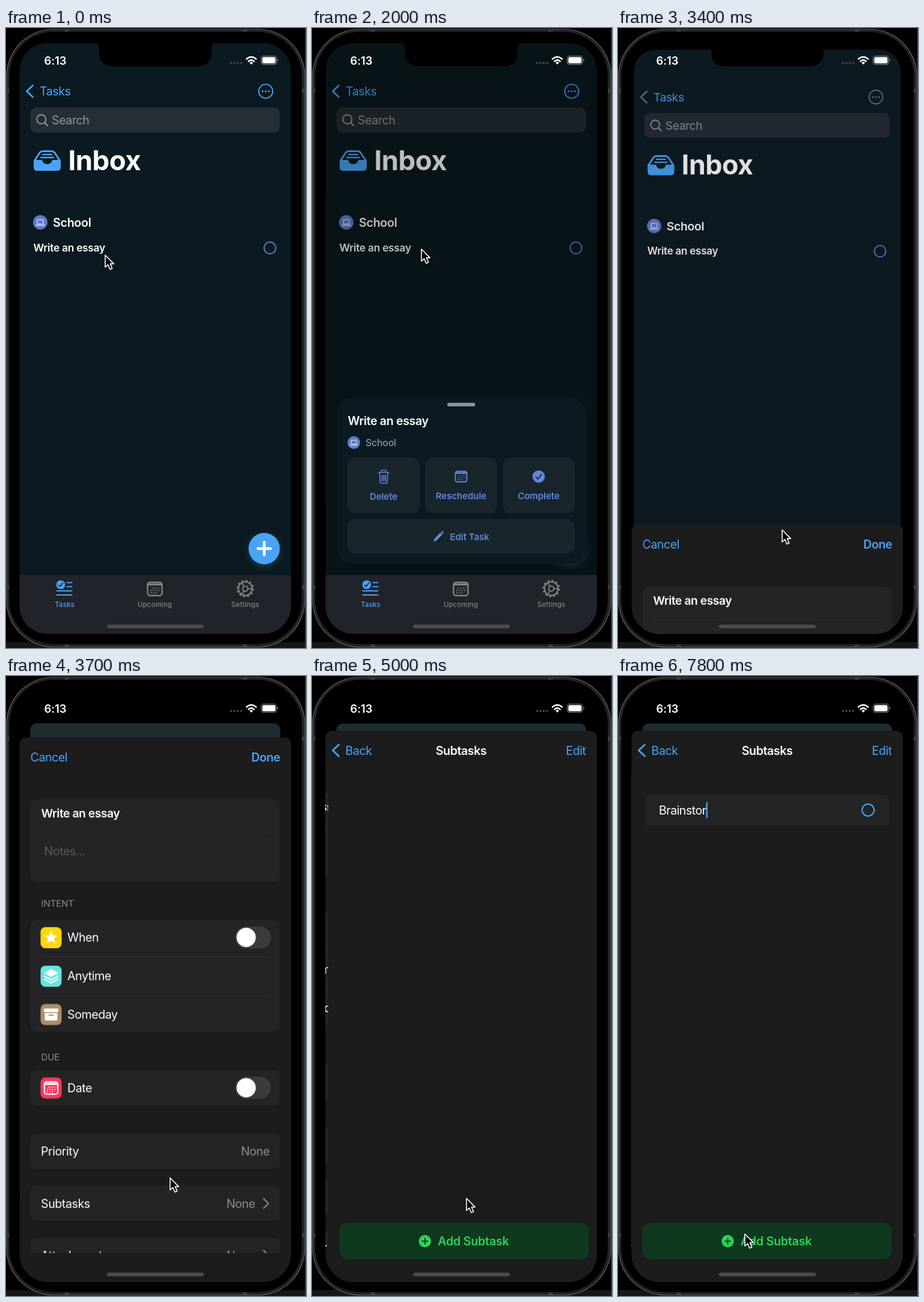
Recreate the animation shown at these times as an HTML page. Size 499x1029 px, loop 8 s.

```html
<!DOCTYPE html>
<html lang="en">
<head>
<meta charset="utf-8">
<title>Task app walkthrough</title>
<style>
  html, body { margin: 0; width: 100%; height: 100%; overflow: hidden; background: #000; }
  svg { display: block; width: 499px; height: 1029px; }
  :root { --blue: #4aa3f5; --violet: #6485dc; }
  text { font: 400 19.66px Inter, "Open Sans", sans-serif; letter-spacing: -.47px; fill: #fff; white-space: pre; }
  .semi { font-weight: 600; }
  .mid { text-anchor: middle; }
  .end { text-anchor: end; }
  .blue { fill: var(--blue); }
  .grey { fill: #8e8e93; }
  .faint { fill: #5b5b5f; }
  .small { font-size: 15px; letter-spacing: -.1px; }
  .tab { font-size: 11.56px; font-weight: 500; letter-spacing: .05px; }
  .off { fill: #808286; }
  .act text { font-size: 15px; font-weight: 600; letter-spacing: -.05px; fill: var(--violet); }
  .line { fill: none; stroke: currentColor; stroke-linecap: round; stroke-linejoin: round; }
  .cell { fill: #242426; }
  .rule { stroke: #303032; }

  .anim { animation: 8s linear infinite; }
  #cursor { animation-name: cursor; }
  #layer { animation-name: recede; transform-origin: 248.5px 25px; }
  #back { animation-name: back; }
  #tint { animation-name: tint; }
  #dim { animation-name: dim; }
  #card { animation-name: card; }
  #sheet { animation-name: rise; }
  #form { animation-name: formOut; }
  #formNav { animation-name: navOut; }
  #subs { animation-name: subsIn; }
  #subsNav { animation-name: navIn; }
  #row { animation-name: row; }

  @keyframes cursor {
    0% { transform: translate(165px, 377px); animation-timing-function: ease-in-out; }
    10%, 25% { transform: translate(182px, 367px); animation-timing-function: ease-in-out; }
    33.75%, 48.75% { transform: translate(273px, 833px); animation-timing-function: ease-in-out; }
    53.75%, 70% { transform: translate(257px, 867px); animation-timing-function: ease-in-out; }
    76.25%, 100% { transform: translate(211px, 926px); }
  }
  @keyframes card {
    0%, 13.75% { transform: translateY(410px); animation-timing-function: cubic-bezier(.4, 0, .05, 1); }
    20%, 36.25% { transform: translateY(0); animation-timing-function: ease-in; }
    41.25%, 100% { transform: translateY(410px); }
  }
  @keyframes dim {
    0%, 13.75% { opacity: 0; }
    18.75%, 36.25% { opacity: .26; }
    42.5% { opacity: .12; }
    47.25%, 100% { opacity: 0; }
  }
  @keyframes recede {
    0%, 41.25% { transform: translateY(0) scale(1); animation-timing-function: cubic-bezier(.4, 0, .05, 1); }
    47.25%, 100% { transform: translateY(54px) scale(.92); }
  }
  @keyframes back {
    0%, 41.25% { fill: #0b1920; rx: 44px; animation-timing-function: cubic-bezier(.4, 0, .05, 1); }
    47.25%, 100% { fill: #202b32; rx: 11px; }
  }
  @keyframes tint {
    0%, 41.25% { color: #4aa3f5; }
    42.5%, 100% { color: #6a7177; }
  }
  @keyframes rise {
    0%, 41.25% { transform: translateY(1010px); animation-timing-function: cubic-bezier(.4, 0, .05, 1); }
    47.25%, 100% { transform: translateY(91px); }
  }
  @keyframes formOut {
    0%, 57.5% { transform: translateX(0); animation-timing-function: cubic-bezier(.4, 0, .05, 1); }
    63.5%, 100% { transform: translateX(-135px); }
  }
  @keyframes subsIn {
    0%, 57.5% { transform: translateX(452px); animation-timing-function: cubic-bezier(.4, 0, .05, 1); }
    63.5%, 100% { transform: translateX(0); }
  }
  @keyframes navOut {
    0%, 57.5% { opacity: 1; }
    60%, 100% { opacity: 0; }
  }
  @keyframes navIn {
    0%, 57.5% { opacity: 0; transform: translateX(60px); animation-timing-function: cubic-bezier(.4, 0, .05, 1); }
    62.5%, 100% { opacity: 1; transform: translateX(0); }
  }
  @keyframes row {
    0%, 77.5% { opacity: 0; }
    80%, 100% { opacity: 1; }
  }
</style>
</head>
<body>
<svg viewBox="0 0 499 1029">
  <defs>
    <clipPath id="screen"><rect x="22.5" y="25" width="451.5" height="980.5" rx="46"/></clipPath>
    <clipPath id="list"><rect x="0" y="60" width="700" height="796"/></clipPath>
    <g id="cal" class="line">
      <rect x="-12" y="-11" width="24" height="22" rx="4" stroke-width="2.4"/>
      <path d="M-11-7.5H11" stroke-width="3.6"/>
      <path d="M-5-1.5H9M-7.5 2.5H9M-7.5 6.5H4" stroke-width="2" stroke-dasharray="2 2.4" stroke-linecap="butt"/>
    </g>
    <g id="school">
      <circle r="12" fill="#607cc8"/>
      <g class="line" color="#d5def5" stroke-width="1.3"><rect x="-5" y="-4.5" width="10" height="7.5" rx="1"/><path d="M-7.5 5H7.5"/></g>
    </g>
    <path id="chevron" class="line" d="M44.5 95.5 34.5 105 44.5 114.5" stroke-width="2.8"/>
    <g id="switch">
      <rect x="381" y="-18" width="60" height="36.5" rx="18.2" fill="#3b3b3e"/>
      <circle cx="399.5" r="16" fill="#fff"/>
    </g>
    <path id="more" class="line" d="M428.5-8 436.5 0 428.5 8" stroke-width="2" color="#8e8e93"/>
  </defs>

  <!-- phone body -->
  <rect width="499" height="1029"/>
  <rect y="1019" width="499" height="10" fill="#161616"/>
  <rect x="1" y="2" width="496" height="1025.5" rx="78" fill="#222" stroke="#626262" stroke-width="1.2"/>
  <rect x="5.5" y="6.5" width="486.5" height="1016" rx="73"/>
  <path d="M1 104H5M1 928H5M492 104H497M492 928H497M101 2V6M397 2V6M101 1023V1027M397 1023V1027" stroke="#3c3c3c" stroke-width="7"/>
  <path d="M498.3 0V1029" stroke="#0b6d17" stroke-width="1.4"/>

  <g clip-path="url(#screen)">
    <!-- inbox -->
    <g id="layer" class="anim">
      <rect id="back" class="anim" x="22.5" y="25" width="451.5" height="1080" rx="44"/>
      <g id="tint" class="anim">
        <use href="#chevron"/>
        <circle class="line" cx="432" cy="105" r="11.6" stroke-width="1.9"/>
        <path class="line" d="M426.8 105h.01M432 105h.01M437.2 105h.01" stroke-width="3.2"/>
      </g>
      <text class="blue" x="56" y="112">Tasks</text>
      <rect x="40.5" y="132" width="415" height="41.5" rx="10" fill="#252e35"/>
      <path class="line" d="M65 157.5 69 162M66.3 151.5a7.5 7.5 0 1 1-15 0a7.5 7.5 0 1 1 15 0" stroke-width="1.9" color="#949ba0"/>
      <text x="76" y="160" style="fill:#8f969c">Search</text>
      <g color="#4aa3f5">
        <path class="line" d="M47.5 220 56 207Q58 204.5 61 204.5H76Q79 204.5 81 207L89.5 220" stroke-width="3"/>
        <path class="line" d="M61 210H76M58 215H79" stroke-width="2.3"/>
        <path fill="currentColor" d="M46 219H60Q61.5 226 68.5 226T77 219H91V231Q91 237 85 237H52Q46 237 46 231Z"/>
      </g>
      <text x="103.5" y="236" style="font-size:45.5px;font-weight:700;letter-spacing:-.5px">Inbox</text>
      <use href="#school" x="57" y="322.5"/>
      <text class="semi" x="78" y="330" style="letter-spacing:-.3px">School</text>
      <text class="semi" x="45.5" y="371" style="font-size:17.3px;letter-spacing:-.25px">Write an essay</text>
      <circle class="line" cx="439" cy="365" r="9.7" stroke-width="2" color="#5b7cd0"/>
      <g style="filter:drop-shadow(0 3px 6px #4aa3f544)"><circle cx="429.5" cy="864" r="26" fill="#4aa3f5"/></g>
      <path class="line" d="M429.5 853.5V874.5M419 864H440" stroke-width="4.6" color="#fff"/>
      <rect id="dim" class="anim" x="22" y="25" width="453" height="883"/>
      <rect x="22" y="908" width="453" height="200" fill="#20232a"/>
      <g color="#4aa3f5">
        <circle cx="91" cy="924" r="7.3" fill="currentColor"/>
        <path class="line" d="M87.5 924.5 90 927 94.5 921" stroke-width="1.7" color="#20232a"/>
        <path class="line" d="M101.5 920.5H109.5M101.5 927.3H109.5M84.5 934.3H109.5M84.5 941H109.5" stroke-width="2.1"/>
      </g>
      <g color="#808286">
        <use href="#cal" x="247.5" y="931"/>
        <g class="line" transform="translate(398 930.5)">
          <circle r="11.3" stroke-width="2"/>
          <circle r="13.2" stroke-width="2.6" stroke-dasharray="3.4 3.511" stroke-linecap="butt"/>
          <circle r="4.3" stroke-width="2"/>
          <path d="M4.3 0H11M-2.2-3.7-5.5-9.5M-2.2 3.7-5.5 9.5" stroke-width="1.8"/>
        </g>
      </g>
      <text class="tab mid blue" x="97.5" y="961">Tasks</text>
      <text class="tab mid off" x="247.5" y="961">Upcoming</text>
      <text class="tab mid off" x="398" y="961" style="letter-spacing:.2px">Settings</text>
    </g>

    <!-- task card -->
    <g id="card" class="anim">
      <rect x="41" y="614" width="415" height="276" rx="26" fill="#0b1a21"/>
      <rect x="225" y="622" width="46.5" height="6" rx="3" fill="#8f9396"/>
      <text class="semi" x="59.5" y="658.5" style="letter-spacing:-.4px">Write an essay</text>
      <use href="#school" transform="translate(69.5 688) scale(.87)"/>
      <text x="89" y="693.5" style="font-size:16px;font-weight:500;letter-spacing:-.3px;fill:#8d9498">School</text>
      <g class="act" color="#6485dc">
        <g fill="#18262c">
          <rect x="59" y="713" width="120" height="92.5" rx="13"/>
          <rect x="188.5" y="713" width="119.5" height="92.5" rx="13"/>
          <rect x="317.5" y="713" width="119.5" height="92.5" rx="13"/>
          <rect x="59" y="815" width="378" height="57" rx="13"/>
        </g>
        <path class="line" d="M110.5 737.5H128M115.5 737V735Q115.5 734 116.5 734H122Q123 734 123 735V737M112.5 738 113.5 753.5Q113.6 755.5 115.5 755.5H123Q125 755.5 125 753.5L126 738M116.3 742 116.7 751.5M119.3 742V751.5M122.3 742 121.9 751.5" stroke-width="1.7"/>
        <use href="#cal" transform="translate(248 744.5) scale(.79)"/>
        <circle cx="377" cy="744.5" r="10.3" fill="currentColor"/>
        <path class="line" d="M372.8 745.5 376 748.7 381.3 740.8" stroke-width="1.9" color="#18262c"/>
        <path fill="currentColor" d="M202 852.5 203.5 847.5 213.5 837.5 216.8 840.8 206.8 850.8ZM214.5 836.5 216 835.3Q217 834.8 218.2 836 219.4 837.2 218.8 838.3L217.7 839.7Z"/>
        <text class="mid" x="119" y="783">Delete</text>
        <text class="mid" x="248" y="781.5">Reschedule</text>
        <text class="mid" x="377" y="782">Complete</text>
        <text x="229.5" y="849.5">Edit Task</text>
      </g>
    </g>

    <!-- editor sheet -->
    <g id="sheet" class="anim">
      <rect x="22.5" width="451.5" height="1000" rx="11" fill="#1c1c1d"/>
      <g id="form" class="anim" clip-path="url(#list)">
        <g class="cell">
          <rect x="41" y="103" width="414.5" height="137" rx="9"/>
          <rect x="41" y="303" width="414.5" height="186" rx="9"/>
          <rect x="41" y="552.5" width="414.5" height="58.5" rx="9"/>
          <rect x="41" y="657.5" width="414.5" height="58.5" rx="9"/>
          <rect x="41" y="744" width="414.5" height="58.5" rx="9"/>
          <rect x="41" y="830.5" width="414.5" height="58.5" rx="9"/>
        </g>
        <path class="rule" d="M59 158H438M59 364.5H438M59 428.5H438"/>
        <text class="semi" x="58.5" y="133" style="font-size:19.3px">Write an essay</text>
        <text class="faint" x="63.5" y="196">Notes...</text>
        <text class="small grey" x="58.5" y="281">INTENT</text>
        <text class="small grey" x="58.5" y="536">DUE</text>
        <g transform="translate(75 332.5)">
          <rect x="-17.5" y="-17.5" width="35" height="35" rx="8" fill="#ffd60a"/>
          <path fill="#fff" d="M0-11.5 3-4 11-3.6 4.8 1.5 6.8 9.2 0 5-6.8 9.2-4.8 1.5-11-3.6-3-4Z"/>
        </g>
        <g transform="translate(75 396.5)">
          <rect x="-17.5" y="-17.5" width="35" height="35" rx="8" fill="#63e6e2"/>
          <path fill="#fff" d="M-12-5.5 0-12 12-5.5 0 1Z"/>
          <path class="line" d="M-11 0 0 6 11 0M-11 5 0 11 11 5" stroke-width="2.3" color="#fff"/>
        </g>
        <g transform="translate(75 460)">
          <rect x="-17.5" y="-17.5" width="35" height="35" rx="8" fill="#ac8e68"/>
          <path fill="#fff" d="M-11-10H11Q12-10 12-9V-5Q12-4 11-4H-11Q-12-4-12-5V-9Q-12-10-11-10ZM-10.5-2.5H10.5V7Q10.5 10 7.5 10H-7.5Q-10.5 10-10.5 7Z"/>
          <path class="line" d="M-3.5 1H3.5" stroke-width="2" color="#ac8e68"/>
        </g>
        <g transform="translate(75 582)" color="#fff">
          <rect x="-17.5" y="-17.5" width="35" height="35" rx="8" fill="#ff375f"/>
          <use href="#cal" transform="scale(.92)"/>
        </g>
        <text x="102" y="339">When</text>
        <text x="102" y="403">Anytime</text>
        <text x="102" y="467">Someday</text>
        <text x="102" y="588.5">Date</text>
        <use href="#switch" y="332"/>
        <use href="#switch" y="581.5"/>
        <text x="58" y="694">Priority</text>
        <text class="end grey" x="438.5" y="694">None</text>
        <text x="58" y="780.5">Subtasks</text>
        <text class="end grey" x="414.5" y="780.5">None</text>
        <use href="#more" y="773.5"/>
        <text x="58" y="866.5">Attachments</text>
        <text class="end grey" x="414.5" y="866.5">None</text>
        <use href="#more" y="859.5"/>
      </g>
      <g id="formNav" class="anim">
        <text class="blue" x="40.5" y="40">Cancel</text>
        <text class="blue semi end" x="456" y="40">Done</text>
      </g>

      <!-- subtasks page -->
      <g id="subs" class="anim">
        <rect x="21.5" y="66" width="453" height="940" fill="#1c1c1d"/>
        <g id="row" class="anim">
          <path class="cell" d="M45.5 157V114.5Q45.5 106 54 106H442Q450.5 106 450.5 114.5V157Z"/>
          <text id="hint" class="faint" x="68" y="139">Untitled</text>
          <text id="typed" x="68" y="139" style="letter-spacing:-.55px"></text>
          <rect id="caret" x="68" y="118" width="2.4" height="27" rx="1" fill="#4aa3f5"/>
          <circle class="line" cx="416" cy="131.5" r="10" stroke-width="2" color="#4aa3f5"/>
        </g>
        <rect x="40.5" y="816.5" width="415" height="60.5" rx="14" fill="#0e391e"/>
        <circle cx="182.5" cy="847" r="10.2" fill="#30d158"/>
        <path class="line" d="M182.5 842.5V851.5M178 847H187" stroke-width="2" color="#0e391e"/>
        <text class="semi" x="204" y="854" style="fill:#30d158;letter-spacing:-.25px">Add Subtask</text>
      </g>
      <g id="subsNav" class="anim" color="#4aa3f5">
        <use href="#chevron" y="-72.5"/>
        <text class="blue" x="55.5" y="40">Back</text>
        <text class="semi mid" x="248" y="40">Subtasks</text>
        <text class="blue end" x="455.5" y="40">Edit</text>
      </g>
    </g>
  </g>

  <!-- status bar, notch, home indicator -->
  <path d="M147 24Q155 25 155 32V40Q155 63.500 179 63.500H318Q342 63.500 342 40V32Q342 25 350 24Z"/>
  <text class="semi" x="63.5" y="60.5" style="font-size:18.5px;letter-spacing:-.1px">6:13</text>
  <path class="line" d="M374.5 58h.01M380 58h.01M385.5 58h.01M391 58h.01" stroke-width="3.6" color="#474c50"/>
  <g color="#fff">
    <path class="line" d="M400 51.5Q408 44.5 416 51.5M403.3 55.3Q408 51 412.7 55.3" stroke-width="2.5" stroke-linecap="butt"/>
    <path fill="currentColor" d="M405 57.5Q408 55 411 57.5L408 60.7Z"/>
    <rect class="line" x="424.5" y="46.5" width="25.5" height="14" rx="4" stroke-width="1.1" opacity=".5"/>
    <rect x="426.3" y="48.3" width="22" height="10.4" rx="2.5" fill="currentColor"/>
    <path d="M451.5 51.5Q453 52 453 53.5T451.5 55.5Z" fill="#8b8f92"/>
  </g>
  <rect x="168" y="990.3" width="161" height="6" rx="3" fill="#4c4c4e"/>

  <g id="cursor" class="anim">
    <path d="M0 0V20L4.6 15.8 7.9 23.5 11.6 21.9 8.4 14.4H14.2Z" fill="#000" stroke="#fff" stroke-width="1.6" stroke-linejoin="round"/>
  </g>
</svg>
<script>
  const LOOP = 8000, STEP = 100;
  const word = "Brainstor";
  const keys = [6800, 7000, 7100, 7200, 7300, 7400, 7600, 7700, 7800];
  const get = id => document.getElementById(id);
  const hint = get("hint"), typed = get("typed"), caret = get("caret");
  const anims = document.getAnimations();
  anims.forEach(a => a.pause());

  function type(t) {
    const n = keys.filter(k => k <= t).length;
    typed.textContent = word.slice(0, n);
    hint.style.display = n ? "none" : "";
    caret.setAttribute("x", 68 + (n ? typed.getComputedTextLength() : 0));
    caret.style.opacity = t >= 6700 && t < 6800 ? 0 : t >= 6600 && t < 6700 ? .4 : 1;
  }

  function draw(ms) {
    const t = Math.floor((ms + 30) / STEP) * STEP % LOOP;
    anims.forEach(a => { a.currentTime = t; });
    type(t);
  }

  let start;
  function tick(now) {
    start ??= now;
    draw(now - start);
    requestAnimationFrame(tick);
  }
  draw(0);
  requestAnimationFrame(tick);
</script>
</body>
</html>
```
